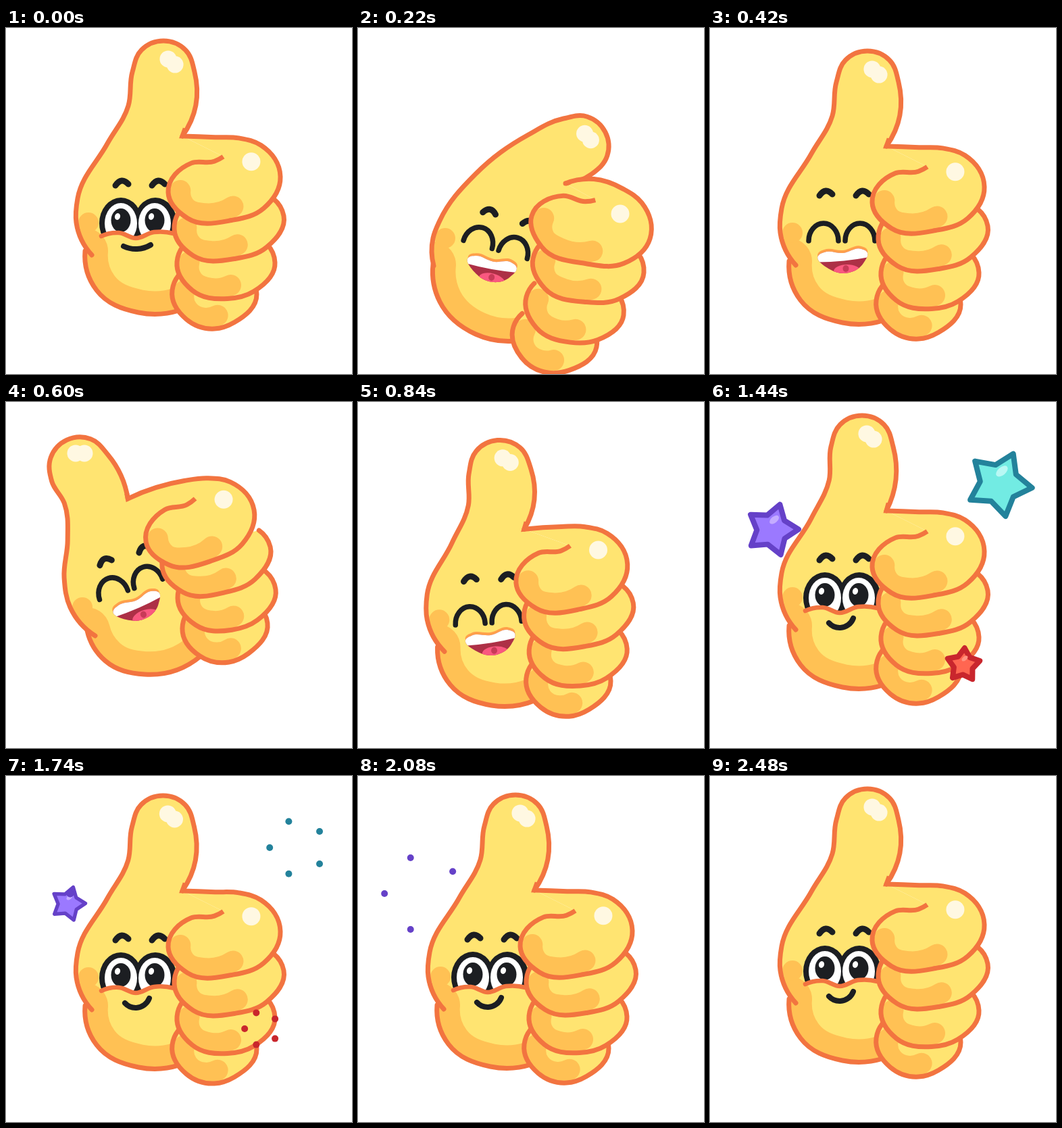
An HTML page with a canvas for the animation above (2500 ms loop, 512 px wide and 512 px high).

```html
<!DOCTYPE html>
<html lang="en">
<head>
<meta charset="utf-8">
<title>Thumbs up</title>
<style>
html, body { margin: 0; width: 100%; height: 100%; overflow: hidden; background: #fff; }
canvas { display: block; width: 100vw; height: 100vh; }
</style>
</head>
<body>
<canvas id="stage" width="512" height="512"></canvas>
<script>
const ctx = document.getElementById('stage').getContext('2d');
const LOOP = 2500, RAD = Math.PI / 180, TIP_RADIUS = 46;
const LINE = '#f27440', SKIN = '#ffe471', SHADE = '#ffc154', SHINE = '#fff8e2', INK = '#1c1e22';

// Skeletons. tip and face are x, y, degrees; each finger is its left and right end.
const upright = {
  crotch: [261, 160], tip: [233, 65, -90], shine: [245, 50],
  back: [[181, 115], [150, 171], [106, 252], [104, 288], [127, 336]],
  palm: [[117, 330], [134, 388], [196, 421], [256, 418]],
  fingers: [[[240, 243], [406, 220]], [[249, 298], [411, 278]], [[253, 346], [398, 347]], [[246, 388], [371, 394]]],
  face: [194, 290, 0]
};
const bowed = {
  crotch: [307, 230], tip: [325, 175, -27], shine: [340, 161],
  back: [[252, 158], [174, 216], [121, 285], [111, 311], [112, 352]],
  palm: [[111, 350], [121, 405], [174, 453], [234, 463]],
  fingers: [[[257, 278], [432, 312]], [[259, 341], [423, 362]], [[249, 398], [393, 425]], [[230, 442], [353, 472]]],
  face: [205, 318, 16]
};
const swung = {
  crotch: [180, 143], tip: [109, 98, -115], shine: [109, 76],
  back: [[86, 150], [91, 205], [86, 260], [95, 304], [132, 346]],
  palm: [[120, 338], [147, 383], [205, 403], [288, 376]],
  fingers: [[[207, 207], [367, 160]], [[231, 244], [391, 214]], [[254, 290], [399, 277]], [[261, 335], [387, 327]]],
  face: [181, 268, -18]
};

const clamp = v => Math.max(0, Math.min(1, v));
const mix = (a, b, k) => a + (b - a) * k;

// Eased value at time t from [time, value] stops.
function key(t, ...stops) {
  if (t <= stops[0][0]) return stops[0][1];
  for (let i = 1; i < stops.length; i++) {
    const [t0, a] = stops[i - 1], [t1, b] = stops[i];
    if (t < t1) return mix(a, b, (1 - Math.cos(Math.PI * (t - t0) / (t1 - t0))) / 2);
  }
  return stops[stops.length - 1][1];
}

// Smooth curve whose tangents are exact for points on a circle.
function spline(path, pts, closed = false, join = false) {
  const n = pts.length, last = closed ? n : n - 1;
  const chord = i => {
    const a = pts[(i + n) % n], b = pts[(i + 1) % n];
    const len = Math.hypot(b[0] - a[0], b[1] - a[1]);
    return { len, x: (b[0] - a[0]) / len, y: (b[1] - a[1]) / len };
  };
  const inner = i => {
    const a = chord(i - 1), b = chord(i);
    const x = a.x / a.len + b.x / b.len, y = a.y / a.len + b.y / b.len, len = Math.hypot(x, y);
    return [x / len, y / len];
  };
  const mirror = (c, [x, y]) => {
    const d = 2 * (c.x * x + c.y * y);
    return [d * c.x - x, d * c.y - y];
  };
  const tangent = i => {
    if (closed || (i > 0 && i < n - 1)) return inner(i);
    return i ? mirror(chord(n - 2), inner(n - 2)) : mirror(chord(0), inner(1));
  };
  path[join ? 'lineTo' : 'moveTo'](...pts[0]);
  for (let i = 0; i < last; i++) {
    const a = pts[i], b = pts[(i + 1) % n], h = chord(i).len * 0.36;
    const u = tangent(i), v = tangent((i + 1) % n === 0 && !closed ? n - 1 : (i + 1) % n);
    path.bezierCurveTo(a[0] + u[0] * h, a[1] + u[1] * h, b[0] - v[0] * h, b[1] - v[1] * h, ...b);
  }
  if (closed) path.closePath();
  return path;
}
const curve = (pts, closed) => spline(new Path2D(), pts, closed);

function fill(path, color) {
  ctx.fillStyle = color;
  ctx.fill(path);
}
function stroke(path, color = LINE, width = 7, cap = 'round') {
  ctx.strokeStyle = color;
  ctx.lineWidth = width;
  ctx.lineCap = cap;
  ctx.stroke(path);
}
function oval(x, y, rx, ry, color, angle = 0) {
  ctx.fillStyle = color;
  ctx.beginPath();
  ctx.ellipse(x, y, rx, ry, angle, 0, 2 * Math.PI);
  ctx.fill();
}
function scoped(draw, clip) {
  ctx.save();
  if (clip) ctx.clip(clip);
  draw();
  ctx.restore();
}

function blend(a, b, c, bow, swing) {
  if (typeof a === 'number') return a + bow * (b - a) + swing * (c - a);
  if (Array.isArray(a)) return a.map((v, i) => blend(v, b[i], c[i], bow, swing));
  return Object.fromEntries(Object.keys(a).map(k => [k, blend(a[k], b[k], c[k], bow, swing)]));
}

function poseAt(t) {
  const bow = key(t, [0, 0], [220, 1], [420, 0]);
  const swing = key(t, [420, 0], [670, 1.21], [900, 0]);
  const lean = key(t, [1060, 0], [1400, -8], [1460, -8], [1800, 0]);
  const pose = blend(upright, bowed, swung, bow, swing);
  pose.tip[0] += lean;
  pose.shine[0] += lean;
  pose.back[0][0] += lean * 0.6;
  pose.joy = clamp(bow + swing);
  return pose;
}

function drawOpenEyes(t) {
  const lid = [[-53, 18], [-27, 13], [-2, 21], [25, 12], [54, 14]];
  const above = curve(lid);
  above.lineTo(80, -90);
  above.lineTo(-80, -90);
  scoped(() => {
    for (const x of [-24, 27]) oval(x, -1, 32, 38, INK);
    for (const x of [-24, 26]) {
      oval(x, -1, 24, 30, '#fff');
      oval(x, -5.5, 14.5, 17.5, INK);
      oval(x - 5, -11, 4, 5, '#fff', 0.3);
    }
  }, above);
  stroke(curve(lid), LINE, 6.5);
  const smile = t < 100 ? [[-20, 33], [0, 37], [20, 31]] : [[-18, 36], [-1, 43], [18, 29]];
  stroke(curve(smile), INK, 8);
}

function drawLaugh() {
  for (const x of [-26, 28]) {
    const lash = new Path2D();
    lash.ellipse(x, 10, 22, 26, 0, Math.PI, 2 * Math.PI);
    stroke(lash, INK, 7.5);
  }
  const mouth = curve([[-33, 31], [-25, 27], [3, 28], [30, 22], [38, 26], [33, 43], [12, 57], [-15, 53]], true);
  scoped(() => {
    ctx.translate(0, -4);
    fill(mouth, '#ffa04a');
  });
  fill(mouth, '#ad3046');
  scoped(() => {
    oval(9, 55, 20, 10, '#f9587f');
    oval(7, 51, 4.5, 5, '#c83a58');
    stroke(curve([[-36, 30], [3, 28], [42, 22]]), '#fff', 23);
  }, mouth);
}

function drawFace(t, { face: [x, y, angle], joy }) {
  scoped(() => {
    ctx.translate(x, y);
    ctx.rotate(angle * RAD);
    for (const side of [-23, mix(31, 38, joy)]) {
      const top = mix(-61, -42, joy);
      const brow = new Path2D();
      brow.moveTo(side - 9, top + 4);
      brow.quadraticCurveTo(side, top - 9, side + 10, top + 2);
      stroke(brow, INK, 9);
    }
    if (t >= 100 && t < 860) return drawLaugh();
    if (t >= 860) ctx.translate(0, key(t, [1060, 13], [1300, 0]));
    drawOpenEyes(t);
  });
}

// Maps distances along and below a finger's axis to the stage.
function fingerAxis([a, b]) {
  const len = Math.hypot(b[0] - a[0], b[1] - a[1]);
  const x = (b[0] - a[0]) / len, y = (b[1] - a[1]) / len;
  return { len, at: (u, v) => [a[0] + u * x - v * y, a[1] + u * y + v * x] };
}

function fingerPoints({ len, at }, crotch) {
  const belly = [at(0, 0), at(23, 42), at(len * 0.52, 54), at(len - 31, 43), at(len, 0)];
  if (!crotch) return [at(8, -22), ...belly, at(len - 12, -27)];
  return [at(88, -41), at(74, -36), at(40, -38), ...belly, at(len - 22, -50), at(len - 53, -65), at(80, -71), crotch];
}

function drawFinger(axis, points, thumbSide) {
  const { len, at } = axis;
  const path = curve(points);
  fill(path, SKIN);
  const shade = curve([at(18, 0), at(24, 27), at(50, 39), at(len * 0.55, 34)]);
  scoped(() => stroke(shade, SHADE, 31), path);
  if (thumbSide) path.lineTo(...thumbSide);
  stroke(path, LINE, 7, thumbSide ? 'butt' : 'round');
}

function drawHand(t, pose) {
  const { crotch, back, palm } = pose;
  const [tx, ty, turn] = pose.tip;
  const tip = [90, 45, 0, -45, -90].map(d => (d + turn) * RAD)
    .map(a => [tx + TIP_RADIUS * Math.cos(a), ty + TIP_RADIUS * Math.sin(a)]);
  const upper = [crotch, ...tip, ...back];
  const axes = pose.fingers.map(fingerAxis);
  const index = fingerPoints(axes[0], crotch);

  const body = curve(upper);
  spline(body, palm, false, true);
  body.lineTo(...index[5]);
  body.lineTo(...index[0]);
  body.closePath();
  fill(body, SKIN);
  scoped(() => {
    stroke(curve(palm), SHADE, 68);
    oval(back[3][0] + 18, back[3][1], 15, 15, SHADE);
  }, body);
  stroke(curve(palm));
  stroke(curve(upper));
  drawFace(t, pose);

  for (const i of [3, 2, 1]) drawFinger(axes[i], fingerPoints(axes[i]));
  drawFinger(axes[0], index, [mix(crotch[0], tip[0][0], 0.12) + 2, mix(crotch[1], tip[0][1], 0.12)]);

  const [sx, sy] = pose.shine;
  const across = Math.atan2(sy - ty, sx - tx) + Math.PI / 2;
  for (const d of [-6.5, 6.5]) oval(sx + d * Math.cos(across), sy + d * Math.sin(across), 12.5, 12.5, SHINE);
  oval(...axes[0].at(128, -28), 13.5, 13.5, SHINE);
}

// from and to are x, y, radius.
const stars = [
  { from: [88, 235, 4], to: [92, 189, 39], turn: -73, line: '#6541c8', fill: '#9b79ff', light: '#c4acff', burst: 1800 },
  { from: [420, 257, 2], to: [428, 121, 49], turn: -65, line: '#23829b', fill: '#72ebe3', light: '#b9f8f4', burst: 1660 },
  { from: [377, 449, 14], to: [375, 389, 25], turn: -86, line: '#c9262d', fill: '#ff6651', light: '#ff9482', burst: 1730 }
];

function drawStar(star, t) {
  if (t < 960) return;
  const p = 1 - (1 - clamp((t - 960) / 340)) ** 2;
  const [x, y, r] = star.from.map((v, i) => mix(v, star.to[i], p));
  const size = r * clamp((t - 960) / 40) * clamp((star.burst - t) / 90);
  if (size > 0) {
    const path = new Path2D();
    for (let i = 0; i < 10; i++) {
      const a = (star.turn - 78 * (1 - p) + i * 36) * RAD;
      const d = i % 2 ? size * mix(0.3, 0.58, p) : size;
      path.lineTo(x + d * Math.cos(a), y + d * Math.sin(a));
    }
    path.closePath();
    ctx.lineJoin = 'round';
    fill(path, star.fill);
    stroke(path, star.line, 8 * size / star.to[2]);
    ctx.lineJoin = 'miter';
    oval(x + size * 0.08, y - size * 0.38, size * 0.21, size * 0.12, star.light, -0.7);
  }
  const fly = (t - star.burst + 60) / 400;
  if (fly > 0 && fly < 1) {
    const dist = 56 * (1 - (1 - fly) ** 3);
    const dot = 5 * clamp((1 - fly) * 7);
    for (let i = 0; i < 5; i++) {
      const a = (i * 72 - 108) * RAD;
      oval(x + 3 + dist * Math.cos(a), y - 15 + dist * Math.sin(a), dot, dot, star.line);
    }
  }
}

function frame() {
  const t = performance.now() % LOOP;
  const drop = key(t, [220, 0], [420, 15], [590, 0], [670, 0], [900, 37], [1060, 13], [1280, -8],
    [1440, 1], [1860, 12], [2080, 9], [2480, 0]);
  const tilt = key(t, [860, 0], [1060, 0.026], [1300, 0]);
  ctx.fillStyle = '#fff';
  ctx.fillRect(0, 0, 512, 512);
  drawStar(stars[0], t);
  drawStar(stars[1], t);
  scoped(() => {
    ctx.translate(110, 400 + drop);
    ctx.rotate(tilt);
    ctx.translate(-110, -400);
    drawHand(t, poseAt(t));
  });
  drawStar(stars[2], t);
  requestAnimationFrame(frame);
}
frame();
</script>
</body>
</html>
```
